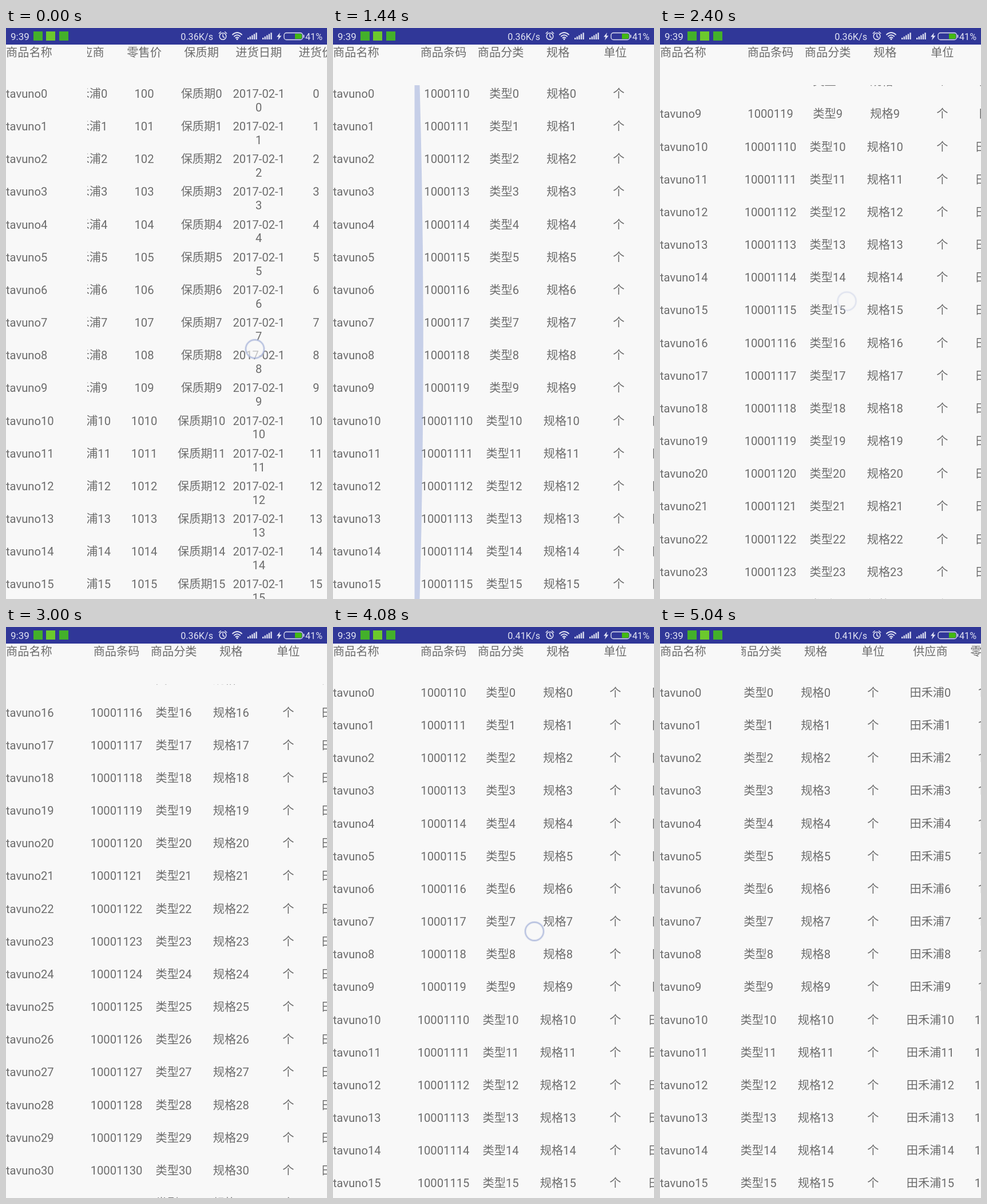
These frames come from a looping animation (561x998 px, 5160 ms). An HTML page:

```html
<!DOCTYPE html>
<html lang="zh-CN">
<head>
<meta charset="utf-8">
<title>表格滚动</title>
<style>
  html, body { margin: 0; width: 100%; height: 100%; overflow: hidden; background: #f8f8f8; }
  #stage {
    position: relative; width: 561px; height: 998px; overflow: hidden; background: #f8f8f8;
    font: 20.2px/23.8px Roboto, "Noto Sans CJK SC", "Noto Sans CJK", sans-serif; color: #6c6c6c;
  }
  #stage div { position: absolute; white-space: pre; }
  #stage .pane { overflow: hidden; left: 0; width: 142px; top: 100px; height: 898px; }
  #stage .right { left: 142px; width: 419px; }
  #stage .top { top: 28px; height: 72px; }
  .cell { width: 100.1px; text-align: center; }
  svg { position: absolute; left: 0; top: 0; }
  #bar text { font: 16.2px Roboto, sans-serif; fill: #e2e4f3; }
</style>
</head>
<body>
<div id="stage">
  <div class="pane top"><div style="top:4px">商品名称</div></div>
  <div class="pane top right"><div id="head" style="top:4px"></div></div>
  <div class="pane"><div id="names"></div></div>
  <div class="pane right"><div id="grid"></div></div>

  <svg width="561" height="998">
    <path id="glow" fill="#3054b8" fill-opacity=".25"/>
    <g id="ring">
      <circle r="16" fill="#f8f8f8" fill-opacity=".62"/>
      <circle r="16" fill="none" stroke="#a9b5da" stroke-opacity=".3" stroke-width="4"/>
      <circle r="16" fill="none" stroke="#a9b5da" stroke-opacity=".75" stroke-width="1.8"/>
    </g>
  </svg>

  <svg id="bar" width="561" height="29">
    <rect width="561" height="29" fill="#303798"/>
    <text x="8" y="20.5" style="font-size:17px">9:39</text>
    <rect x="48" y="6" width="16" height="16" fill="#43b02a"/>
    <rect x="70" y="6" width="16" height="16" fill="#6cc92c"/>
    <rect x="93" y="6" width="16" height="16" fill="#43b02a"/>
    <text id="speed" x="362" y="20.5" text-anchor="end"></text>
    <g fill="none" stroke="#e2e4f3" stroke-width="1.5" stroke-linecap="round">
      <circle cx="379" cy="14.5" r="5.8"/>
      <path d="M379 11v4l2.5 1.5M372.3 9.5l3-2.7M385.7 9.5l-3-2.7"/>
      <path d="M396 11.5q8-7 16 0M398.8 14.5q5.2-4.5 10.4 0M401.5 17.3q2.5-2 5 0" stroke-width="1.9"/>
      <rect x="486" y="8.5" width="32.5" height="12" rx="4" stroke-width="1.3"/>
      <path d="M520.5 12.5v4"/>
    </g>
    <circle cx="404" cy="19.5" r="1.5" fill="#e2e4f3"/>
    <g id="signal" fill="#e2e4f3"></g>
    <path d="M479 8l-6 7.5h3.5l-1.5 6 6.5-8h-3.7z" fill="#e2e4f3"/>
    <path d="M505 10h9.5q2.5 0 2.5 2.5v4q0 2.5-2.5 2.5h-9.5z" fill="#43b913"/>
    <text x="553" y="20.5" text-anchor="end">41%</text>
  </svg>
</div>

<script>
const LOOP = 5160, STEP = 120;
const ROWS = 42, PITCH = 57.17, COL = 100.1;
const $ = id => document.getElementById(id);

const columns = [
  ['商品条码', i => '100011' + i],
  ['商品分类', i => '类型' + i],
  ['规格', i => '规格' + i],
  ['单位', () => '个'],
  ['供应商', i => '田禾浦' + i],
  ['零售价', i => '10' + i],
  ['保质期', i => '保质期' + i],
  ['进货日期', i => '2017-02-1\n' + i],
  ['进货价', i => '' + i]
];

function put(parent, text, x, y, cls = '') {
  const el = document.createElement('div');
  el.className = cls;
  el.textContent = text;
  el.style.left = x + 'px';
  el.style.top = y + 'px';
  parent.append(el);
}

columns.forEach(([title], c) => put($('head'), title, 1 + c * COL, 0, 'cell'));
for (let i = 0; i < ROWS; i++) {
  const y = 3.9 + i * PITCH;
  put($('names'), 'tavuno' + i, 0, y);
  columns.forEach(([, value], c) => put($('grid'), value(i), 1 + c * COL, y, 'cell'));
}

for (const x of [422, 448]) {
  for (let b = 0; b < 5; b++) {
    const bar = document.createElementNS('http://www.w3.org/2000/svg', 'rect');
    const height = 3 + b * 2.2;
    Object.entries({ x: x + b * 3.6, y: 20 - height, width: 2.3, height })
      .forEach(([k, v]) => bar.setAttribute(k, v));
    $('signal').append(bar);
  }
}

const progress = (t, from, to) => Math.min(1, Math.max(0, (t - from) / (to - from)));
const easeOut = (p, power) => 1 - (1 - p) ** power;
const smooth = p => p * p * (3 - 2 * p);

// Rightward fling into the left edge, later a leftward swipe.
const scrollX = t => 452 * (1 - progress(t, 0, 1433)) + 121 * easeOut(progress(t, 4080, 5040), 2);
// Long scroll down the list, then a fling back to the top.
const scrollY = t => 1093 * (easeOut(progress(t, 1800, 3480), 1.305) - smooth(progress(t, 3480, 4080)));
// Edge pull on impact, relaxing to rest.
const edgePull = t => t < 1440 ? 0 : 1 - progress(t, 1440, 1800);

const strokes = [
  { start: 0, time: 960, x: 435, y: 561, dx: 14, dy: 64 },
  { start: 1800, time: 650, x: 345, y: 760, dx: -20, dy: -306 },
  { start: 3480, time: 240, x: 366, y: 556, dx: 2, dy: 180 },
  { start: 4080, time: 480, x: 352, y: 532, dx: -110, dy: 2 }
];

function drawRing(t) {
  const s = strokes.find(s => t >= s.start && t < s.start + s.time);
  $('ring').style.opacity = 0;
  if (!s) return;
  const p = (t - s.start) / s.time;
  $('ring').style.opacity = Math.min(1, 8 * (1 - p)) ** 2;
  $('ring').setAttribute('transform', `translate(${s.x + s.dx * p} ${s.y + s.dy * p})`);
}

function draw(t) {
  const sx = scrollX(t), sy = scrollY(t), pull = edgePull(t);
  $('head').style.transform = `translate(${-sx}px,0)`;
  $('names').style.transform = `translate(0,${-sy}px)`;
  $('grid').style.transform = `translate(${6 * pull - sx}px,${-sy}px)`;

  const edge = 142.5 + 9 * pull, peak = edge + 12.5 * pull;
  $('glow').setAttribute('d', `M142.5 100H${edge}Q${peak} 549 ${edge} 998H142.5Z`);
  $('glow').style.opacity = pull;

  drawRing(t);
  $('speed').textContent = t < 3720 ? '0.36K/s' : '0.41K/s';
}

const start = performance.now();
function tick() {
  const t = (performance.now() - start) % LOOP;
  draw(Math.floor(t / STEP) * STEP);
  requestAnimationFrame(tick);
}
tick();
</script>
</body>
</html>
```
